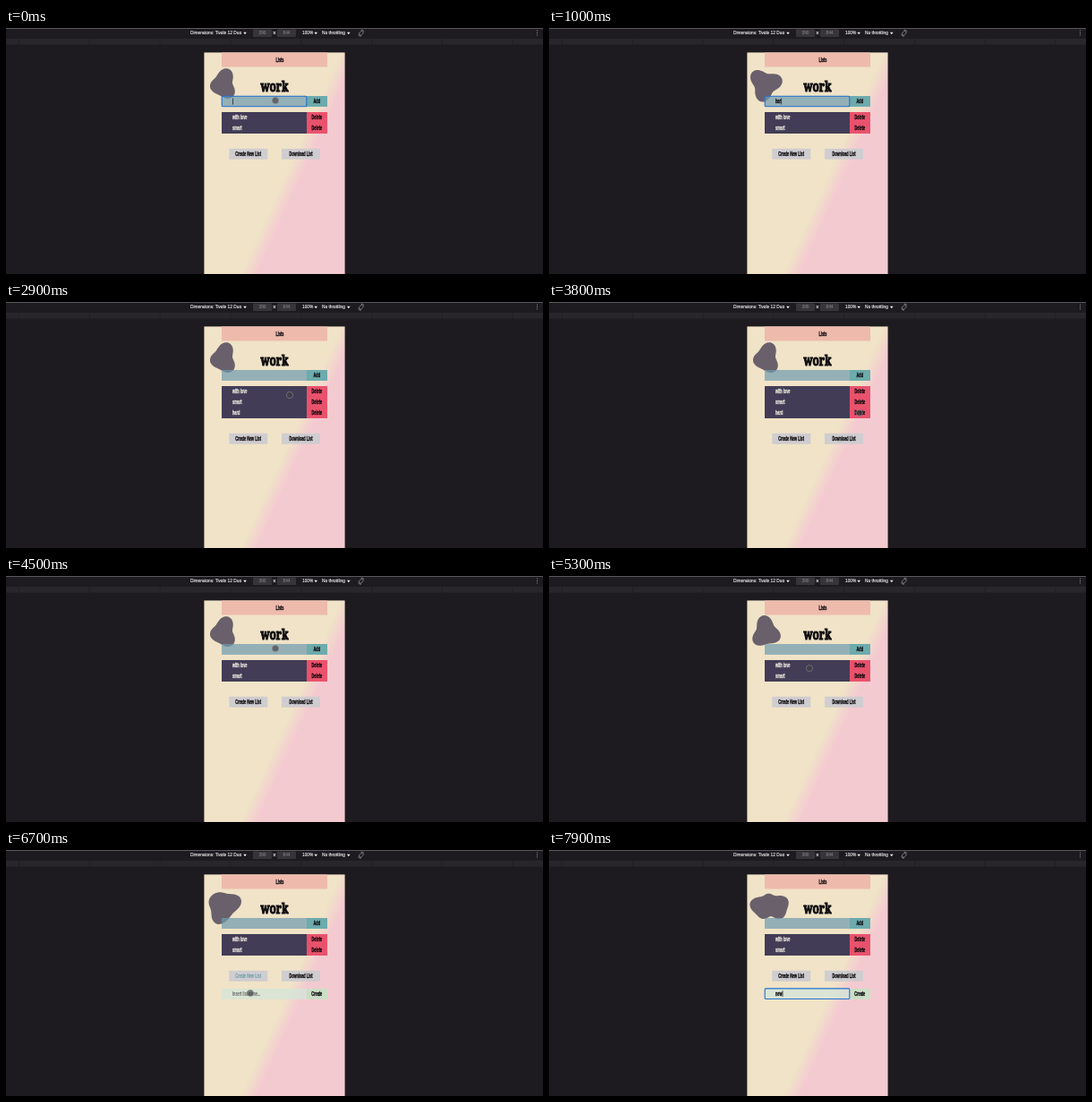
These frames come from a looping animation (600 px wide and 275 px high, 8000 ms). An HTML page:

```html
<!DOCTYPE html>
<html lang="en">
<head>
<meta charset="utf-8">
<title>List app</title>
<style>
  html, body { margin: 0; width: 100%; height: 100%; overflow: hidden; background: #1e1b20; }
  svg { display: block; width: 600px; height: 275px; }
  text { font-family: "Liberation Sans", Arial, sans-serif; white-space: pre; }
  .bar text { font-size: 4.8px; fill: #f0f0f2; stroke: #f0f0f2; stroke-width: .12px; }
  .bar .dim { fill: #918f94; stroke: none; text-anchor: middle; }
  .ui text { font-size: 7px; font-weight: 700; fill: #0c0a0d; stroke: #0c0a0d; stroke-width: .35px; }
  .ui .mid { text-anchor: middle; }
  .ui .item { fill: #ebe5dc; stroke: #ebe5dc; }
  .ui .hint { fill: #5e6462; stroke: none; }
  .ui .active { fill: #619ba5; stroke: none; }
  .ui .title { font: 900 16.5px "Noto Serif", "Liberation Serif", serif; text-anchor: middle; stroke-width: 1.1px; }
  .ring { fill: none; stroke: #2271d1; stroke-width: 1.1; }
  .grey { fill: #cfcdd0; }
  .red { fill: #e9526c; }
</style>
</head>
<body>
<svg viewBox="0 0 600 275">
  <defs>
    <linearGradient id="page" gradientUnits="userSpaceOnUse" x1="320.5" y1="146.5" x2="335.5" y2="153.3">
      <stop offset="0" stop-color="#f0e3c7"/>
      <stop offset="1" stop-color="#f4cad1"/>
    </linearGradient>
    <pattern id="ruler" patternUnits="userSpaceOnUse" x="14" y="12" width="78.8" height="6.5">
      <rect width="78.8" height="6.5" fill="#28262a"/>
      <rect width=".8" height="6.5" fill="#1e1b20"/>
    </pattern>
  </defs>

  <rect width="600" height="275" fill="#1e1b20"/>
  <g class="bar">
    <rect width="600" height="12" fill="#1d1b1f"/>
    <rect width="600" height="1" fill="#5b595d"/>
    <rect y="12" width="600" height="6.5" fill="url(#ruler)"/>
    <rect x="276" y="1.5" width="21" height="8.5" rx="1" fill="#37353a"/>
    <rect x="303" y="1.5" width="21" height="8.5" rx="1" fill="#37353a"/>
    <text x="206" y="7.4">Dimensions: Tivole 12 Duo</text>
    <text class="dim" x="286.5" y="7.4">390</text>
    <text class="dim" x="313.5" y="7.4">844</text>
    <text x="298" y="7.9" style="font-size:6.5px">×</text>
    <text x="331" y="7.4">100%</text>
    <text x="353" y="7.4">No throttling</text>
    <path d="M265.2 4.8h3.6l-1.8 2.4zM344.4 4.8h3.6l-1.8 2.4zM381 4.8h3.6l-1.8 2.4z" fill="#f0f0f2"/>
    <path d="M394.2 6.2l3-3 2.2 2.2-3 3zM396.6 2.2q3-.6 3.2 2M397 9.2q-3 .2-3.2-2" fill="none" stroke="#a3a2a6" stroke-width=".7"/>
    <path d="M593.5 3v.1M593.5 5.4v.1M593.5 7.8v.1" stroke="#a3a2a6" stroke-linecap="round"/>
  </g>

  <g class="ui">
    <rect x="221.4" y="27.4" width="157.2" height="248" fill="url(#page)"/>
    <rect x="241" y="27.4" width="118" height="16.1" fill="#eebaac"/>
    <path id="blob" fill="#6a606b"/>
    <text class="title" transform="translate(300 71.4) scale(.72 1)">work</text>

    <rect x="241" y="76" width="95" height="12" fill="#6e9cb0" fill-opacity=".7"/>
    <rect x="336" y="76" width="23" height="12" fill="#6dabad"/>

    <rect id="list" x="241" y="94" width="95" fill="#423c56"/>
    <rect id="deletes" class="red" x="336" y="94" width="23"/>
    <g transform="scale(.55 1)" id="labels"></g>

    <g id="foot">
      <rect class="grey" x="249.3" y="134.8" width="43" height="12"/>
      <rect class="grey" x="308" y="134.8" width="43" height="12"/>
      <g transform="scale(.55 1)" id="footLabels"></g>
    </g>

    <g id="newRow">
      <rect x="241" y="155" width="95" height="12" fill="#d3e6da" fill-opacity=".75"/>
      <rect x="336" y="155" width="23" height="12" fill="#cbdfc5"/>
      <g transform="scale(.55 1)" id="newLabels"></g>
    </g>

    <rect id="ring" class="ring" x="241.2" width="94.6" height="11.6" rx="1"/>
    <rect id="caret" width=".7" height="7" fill="#14121a"/>
    <circle id="cursor" r="3.6" fill="#403d43" fill-opacity=".65" stroke="#8b888c" stroke-width=".6"/>
  </g>
</svg>
<script>
const LOOP = 8000, STEP = 100, NARROW = .55;
const ADD = 2400, REMOVE = 4000, OPEN_FORM = 5700, FOCUS_NAME = 6900;

const $ = id => document.getElementById(id);
const show = (el, on) => { el.style.display = on ? '' : 'none'; };
const set = (el, attrs) => {
  for (const key in attrs) el.setAttribute(key, attrs[key]);
  return el;
};
const smooth = (from, to, v) => {
  const k = Math.min(1, Math.max(0, (v - from) / (to - from)));
  return k * k * (3 - 2 * k);
};

// Labels live in groups that share one narrow scale.
function label(parent, str, x, y, cls) {
  const el = document.createElementNS('http://www.w3.org/2000/svg', 'text');
  set(el, { x: x / NARROW, y: y + 2.4, class: cls }).textContent = str;
  return $(parent).appendChild(el);
}

label('labels', 'Lists', 306, 35.7, 'mid');
label('labels', 'Add', 347.3, 82, 'mid');
const rows = ['with love', 'smart', 'hard'].map((str, i) => [
  label('labels', str, 253, 100 + 12 * i, 'item'),
  label('labels', 'Delete', 347.3, 100 + 12 * i, 'mid')
]);
const task = label('labels', '', 253, 82, '');
const createList = label('footLabels', 'Create New List', 270.6, 140.7, 'mid');
label('footLabels', 'Download List', 329.5, 140.7, 'mid');
const listName = label('newLabels', '', 253, 160.8, '');
label('newLabels', 'Create', 347.3, 160.8, 'mid');

// A circle bent by waves of two, three and five lobes.
// It swings between a bell and a heart, then stretches sideways.
function blobPath(t) {
  const heart = smooth(-.2, .8, Math.cos((t - 1500) / 4800 * 2 * Math.PI));
  const wide = smooth(5900, 7900, t);
  const rad = Math.PI / 180;
  const cx = 243 - 1.5 * heart + 4 * wide;
  const radius = 14.3 + 1.7 * heart + 2.7 * wide;
  const turn = (50 - 67 * heart) * rad;
  const axis = 70 * (wide - 1) * rad;
  const tall = .12 * (1 - heart) * (1 - wide);
  const lobes = (.18 + .06 * heart) * (1 - .9 * wide);

  const points = Array.from({ length: 72 }, (_, i) => {
    const a = i * 5 * rad;
    const r = radius * (1 - tall * Math.cos(2 * a)
      + .25 * wide * Math.cos(2 * (a - axis))
      + lobes * Math.cos(3 * (a - turn))
      + .09 * wide * Math.cos(5 * (a + 97 * rad)));
    return [cx + r * Math.cos(a), 63 + r * Math.sin(a)].map(v => v.toFixed(2));
  });
  return `M${points.join('L')}z`;
}

// The pointer rests at each stop and glides to the next one, arriving at its time.
const GLIDE = 500;
const stops = [
  { t: 0, x: 301, y: 81 },
  { t: 1800, x: 347, y: 66 },
  { t: 2350, x: 347, y: 82 },
  { t: 2900, x: 317, y: 104 },
  { t: 3800, x: 347, y: 124 },
  { t: 4500, x: 301, y: 81 },
  { t: 5600, x: 272.5, y: 144 },
  { t: 6600, x: 273, y: 160 }
];

function pointer(t) {
  let { x, y } = stops[0];
  for (const stop of stops.slice(1)) {
    const k = smooth(stop.t - GLIDE, stop.t, t);
    x += (stop.x - x) * k;
    y += (stop.y - y) * k;
  }
  return { cx: x, cy: y };
}

// What a field holds at time t, and when it was last touched.
function typing(word, focus, start, gap, t) {
  const count = Math.min(word.length, Math.max(0, Math.floor((t - start) / gap) + 1));
  return { text: word.slice(0, count), last: count ? start + (count - 1) * gap : focus };
}

function draw(t) {
  const onTask = t < ADD, onName = t >= FOCUS_NAME;
  const added = t >= ADD && t < REMOVE;

  set($('blob'), { d: blobPath(t) });
  for (const id of ['list', 'deletes']) set($(id), { height: added ? 36 : 24 });
  rows[2].forEach(el => show(el, added));
  set($('foot'), { transform: `translate(0 ${added ? 12 : 0})` });

  const first = typing('hard', 0, 400, 300, t);
  const second = typing('new', FOCUS_NAME, 7400, 200, t);
  task.textContent = onTask ? first.text : '';
  listName.textContent = second.text || 'Insert list name...';
  listName.classList.toggle('hint', !second.text);
  createList.classList.toggle('active', t >= OPEN_FORM - 200 && !onName);
  show($('newRow'), t >= OPEN_FORM);

  const entry = onTask ? first : second;
  const top = onTask ? 76 : 154.7;
  const width = entry.text ? (onTask ? task : listName).getComputedTextLength() * NARROW : 0;
  show($('ring'), onTask || onName);
  set($('ring'), { y: top + .2 });
  show($('caret'), (onTask || onName) && (t - entry.last) % 1000 < 500);
  set($('caret'), { x: 253.2 + width, y: top + 2.5 });

  set($('cursor'), pointer(t));
  show($('cursor'), t < 400 || (t >= 1400 && t < 7300));
}

const start = performance.now();
function tick() {
  const t = (performance.now() - start) % LOOP;
  draw(Math.floor(t / STEP) * STEP);
  requestAnimationFrame(tick);
}
tick();
</script>
</body>
</html>
```
